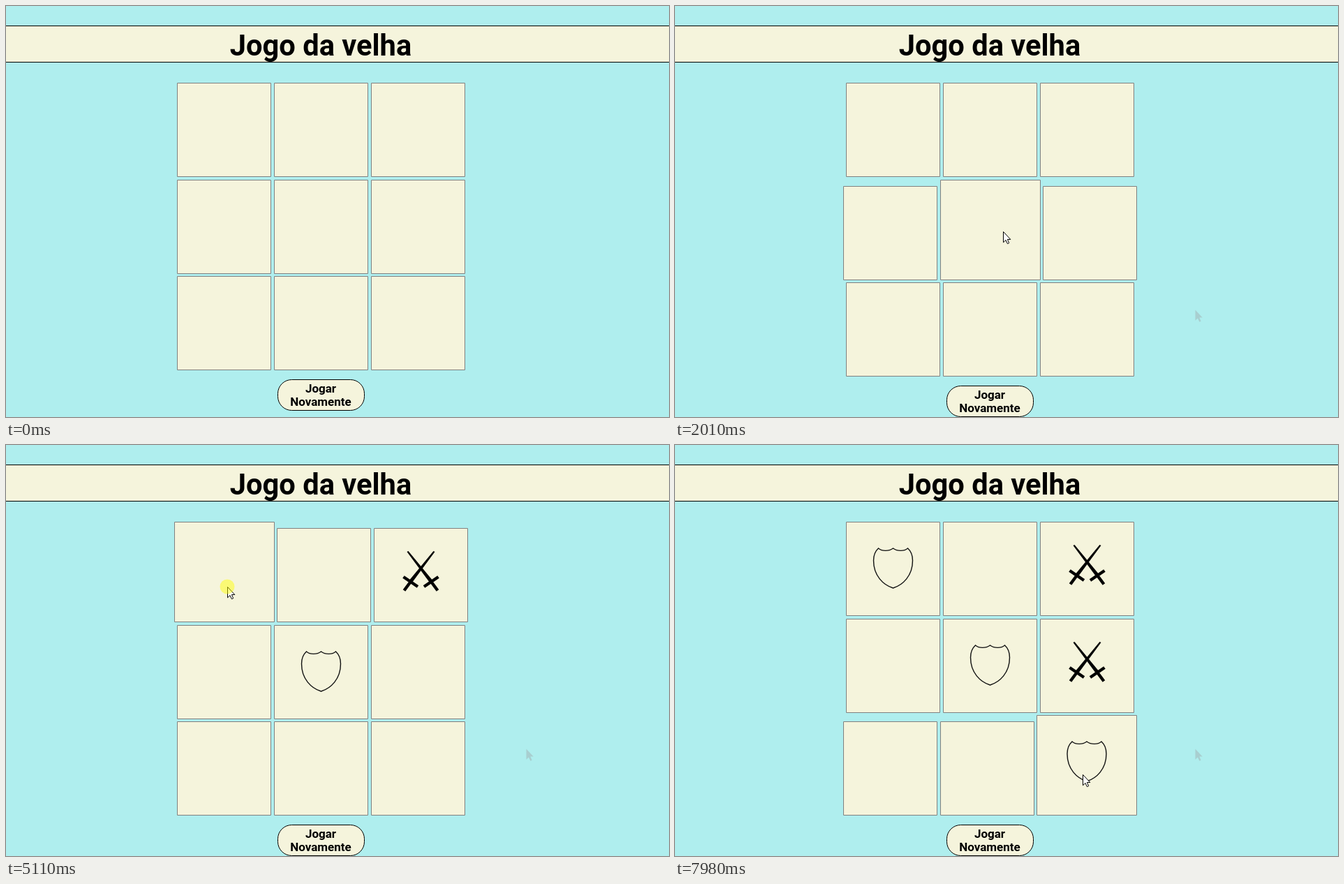
Animation of 950 by 589 pixels, one loop 8000 ms. Source, as an HTML page with a canvas:

```html
<!DOCTYPE html>
<html lang="pt">
<meta charset="utf-8">
<title>Jogo da velha</title>
<style>
  html, body { margin: 0; height: 100%; overflow: hidden; background: #afeeee; }
  canvas { display: block; }
</style>
<canvas id="stage" width="950" height="589"></canvas>
<script>
const ctx = document.getElementById('stage').getContext('2d');
const LOOP = 8000, PITCH = 138.7, GROW = 8.8, LEFT = 245.2, TOP = 110;
const BEIGE = '#f5f4dc';

// Pointer moves: first step, last step, number of steps, destination
const START = [914, 594];
const MOVES = [
  [310, 570, 5, 896, 460],
  [780, 990, 4, 705, 578],
  [1250, 1320, 2, 732, 524],
  [1380, 1380, 1, 745, 435],
  [1440, 1570, 3, 625, 330],
  [1640, 2010, 6, 470, 323],
  [2080, 2140, 2, 459, 328],
  [3460, 3660, 4, 579, 185],
  [4580, 4580, 1, 572, 189],
  [4650, 4910, 5, 317, 203],
  [5840, 5910, 2, 378, 291],
  [6000, 6250, 5, 626, 337],
  [7050, 7450, 7, 584, 472],
];
// Clicks: press time, time the mark appears, cell
const CLICKS = [
  [2470, 2670, 4],
  [3850, 4050, 2],
  [5110, 5310, 0],
  [6520, 6720, 5],
  [7710, 7980, 8],
];
const GHOST = { from: 1440, x: 745, y: 435 };

const arrow = new Path2D('M.5 .5V15.8L4 12.5L6.4 17.7L8.7 16.7L6.4 11.5H10.8Z');
const shield = new Path2D('M-21 .5C-16 5-6 5 0 .5C6 5 16 5 21 .5C26 5 28 12 28 18' +
  'C28 40 14 53 0 57.5C-14 53-28 40-28 18C-28 12-26 5-21 .5Z');
const blade = new Path2D('M-20 1L-18 0L16.3 41.5L12.5 45Z');
const hilt = new Path2D('M4.5 51L25 37M14 43L24 56.5');

function pointerAt(t) {
  let [x, y] = START;
  for (const [t0, t1, n, tx, ty] of MOVES) {
    if (t < t0) break;
    const step = n > 1 ? Math.min(n, 1 + Math.floor((t - t0) / (t1 - t0) * (n - 1) + 1e-6)) : 1;
    let p = step / n;
    if (n > 3) p = p * p * (3 - 2 * p);
    x += (tx - x) * p;
    y += (ty - y) * p;
  }
  return [Math.round(x), Math.round(y)];
}

function cellUnder(x, y) {
  const col = Math.floor((x - LEFT + 2) / PITCH), row = Math.floor((y - TOP + 2) / PITCH);
  return col >= 0 && col < 3 && row >= 0 && row < 3 ? row * 3 + col : -1;
}

function at(x, y, draw) {
  ctx.save();
  ctx.translate(x, y);
  draw();
  ctx.restore();
}

function box(x, y, w, h, stroke, radius = 0) {
  ctx.beginPath();
  ctx.roundRect(Math.round(x) + .5, Math.round(y) + .5, w - 1, h - 1, radius);
  ctx.fillStyle = BEIGE;
  ctx.strokeStyle = stroke;
  ctx.lineWidth = 1;
  ctx.fill();
  ctx.stroke();
}

function label(text, y, size) {
  ctx.font = `bold ${size}px Roboto, sans-serif`;
  ctx.fillStyle = '#000';
  ctx.fillText(text, 451, y);
}

function drawShield() {
  ctx.lineWidth = 1.4;
  ctx.strokeStyle = '#111';
  ctx.stroke(shield);
}

function drawSwords() {
  ctx.fillStyle = ctx.strokeStyle = '#000';
  ctx.lineWidth = 4.4;
  for (const side of [1, -1]) {
    ctx.scale(side, 1);
    ctx.fill(blade);
    ctx.stroke(hilt);
  }
}

function drawBoard(t, hover) {
  const hoverRow = hover < 0 ? 9 : Math.floor(hover / 3);
  for (let i = 0; i < 9; i++) {
    const row = Math.floor(i / 3), active = i === hover, inRow = row === hoverRow;
    const size = active ? 144 : 135;
    let x = LEFT + i % 3 * PITCH, y = TOP + row * PITCH;
    if (inRow) x += (i > hover ? GROW : 0) - GROW / 2;
    if (row > hoverRow || inRow && !active) y += GROW;
    box(x, y, size, size, '#808080');

    const turn = CLICKS.findIndex(([, shown, cell]) => cell === i && t >= shown);
    if (turn < 0) continue;
    const cx = Math.round(x) + size / 2;
    if (turn % 2) at(cx, Math.round(y) + 33, drawSwords);
    else at(cx, Math.round(y) + 37.5, drawShield);
  }
}

function draw(t) {
  const [px, py] = pointerAt(t), hover = cellUnder(px, py);
  const drop = hover < 0 ? 0 : 9;
  ctx.fillStyle = '#afeeee';
  ctx.fillRect(0, 0, 950, 589);
  ctx.textAlign = 'center';

  box(-2, 28, 954, 53, '#000');
  label('Jogo da velha', 71, 41.6);
  drawBoard(t, hover);
  box(389, 535 + drop, 125, 45, '#000', 20);
  label('Jogar', 554 + drop, 17);
  label('Novamente', 573 + drop, 17);

  if (t >= GHOST.from) at(GHOST.x, GHOST.y, () => {
    ctx.fillStyle = '#a8cfd0';
    ctx.fill(arrow);
  });

  at(px, py, () => {
    ctx.fillStyle = '#fff';
    ctx.strokeStyle = '#000';
    ctx.lineWidth = 1;
    ctx.fill(arrow);
    ctx.stroke(arrow);
    if (CLICKS.some(([press, shown]) => t >= press && t < shown)) {
      ctx.beginPath();
      ctx.arc(0, 0, 10.5, 0, 2 * Math.PI);
      ctx.fillStyle = 'rgba(255, 255, 0, .47)';
      ctx.fill();
    }
  });
}

const began = performance.now();
function frame() {
  draw((performance.now() - began) % LOOP);
  requestAnimationFrame(frame);
}
frame();
</script>
</html>
```
